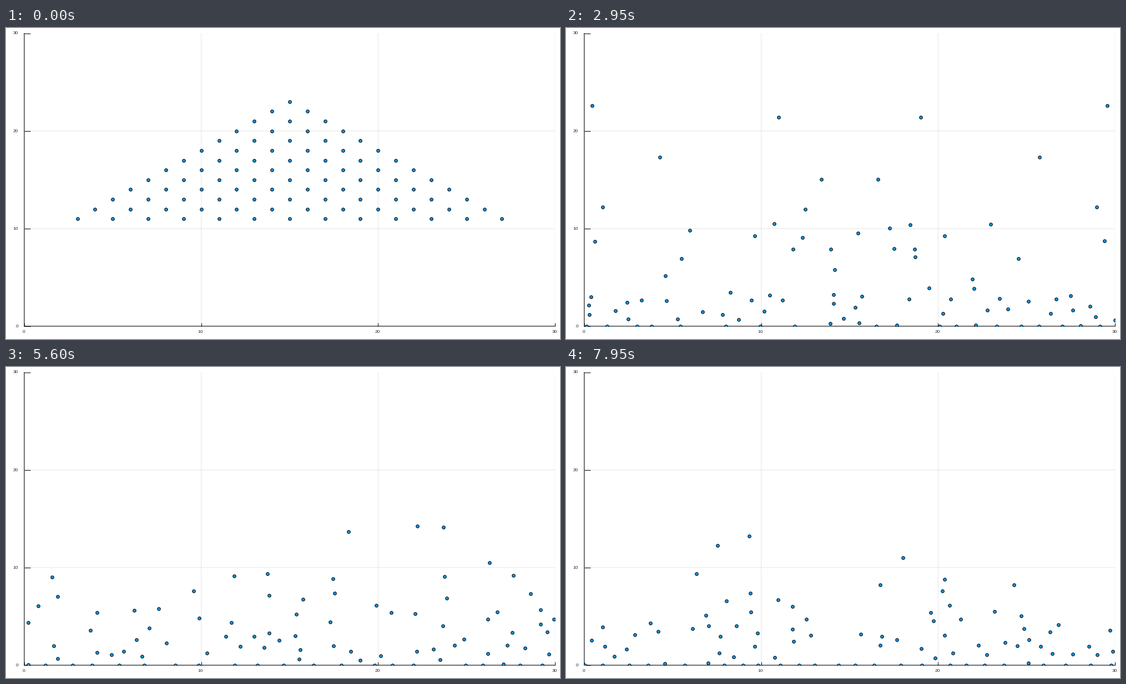
A matplotlib script that plays this animation: 998x561 px, repeating every 8 s.

```python
import numpy as np
import matplotlib.pyplot as plt
from matplotlib.animation import FuncAnimation

W, H, DPI = 998, 561, 100
FRAMES, INTERVAL = 160, 50
SIZE = 30.0                      # side of the box
GRAVITY, BOUNCE = 9.8, 0.75
FRAME_DT, STEPS = 0.075, 50
PX = 72 / DPI                    # one pixel in points


def start():
    """Triangular pile of particles on a diagonal lattice."""
    return np.array([(x, 11 + row) for row in range(13)
                     for x in range(3 + row, 28 - row, 2)], float)


def accel(p):
    """Lennard-Jones pair forces plus gravity."""
    d = p.T[:, :, None] - p.T[:, None, :]
    r2 = d[0] ** 2 + d[1] ** 2
    np.fill_diagonal(r2, np.inf)
    i2 = 1 / r2
    i6 = i2 * i2 * i2
    a = (24 * i6 * (2 * i6 - 1) * i2 * d).sum(axis=2).T
    a[:, 1] -= GRAVITY
    return a


def collide(p, v):
    low, high = p < 0, p > SIZE
    v[low] = BOUNCE * np.abs(v[low])
    v[high] = -BOUNCE * np.abs(v[high])
    np.clip(p, 0, SIZE, out=p)


def simulate():
    p = start()
    v = np.zeros_like(p)
    a = accel(p)
    dt = FRAME_DT / STEPS
    path = [p.copy()]
    for _ in range(FRAMES - 1):
        for _ in range(STEPS):
            v += a * dt / 2
            p += v * dt
            collide(p, v)
            a = accel(p)
            v += a * dt / 2
        path.append(p.copy())
    return path


path = simulate()

fig = plt.figure(figsize=(W / DPI, H / DPI), dpi=DPI, facecolor="white")
left, right, top, bottom = 32.9, 989.1, 9.6, 537.9
ax = fig.add_axes([left / W, 1 - bottom / H, (right - left) / W, (bottom - top) / H])
ax.set(xlim=(0, SIZE), ylim=(0, SIZE))
ticks = [0, 10, 20, 30]
ax.set_xticks(ticks, [])
ax.set_yticks(ticks, [])
ink = "#1a1a1a"
ax.tick_params(axis="x", direction="in", length=6 * PX, width=1.1 * PX, color=ink)
ax.tick_params(axis="y", direction="in", length=11.5 * PX, width=1.1 * PX, color=ink)
ax.set_axisbelow(True)
ax.grid(color="black", alpha=0.1, linewidth=PX, snap=False)
for tick in ax.xaxis.get_major_ticks() + ax.yaxis.get_major_ticks():
    tick.tick1line.set_snap(False)
for side in ("top", "right"):
    ax.spines[side].set_visible(False)
for side in ("left", "bottom"):
    ax.spines[side].set(linewidth=1.2 * PX, color=ink, zorder=1.5, snap=False)

label = dict(family="Liberation Sans", size=8.4 * PX, color="#262626")
for t in ticks:
    x = left + (right - left) * t / SIZE - 1.2
    y = bottom - (bottom - top) * t / SIZE
    fig.text(x / W, 1 - 548.3 / H, str(t), ha="center", va="center", **label)
    fig.text(22.2 / W, 1 - (y + 0.3) / H, str(t), ha="right", va="center", **label)

dots, = ax.plot([], [], "o", markersize=5.6 * PX, markerfacecolor="#009afa",
                markeredgecolor="black", markeredgewidth=PX, zorder=3, snap=False)


def draw(i):
    dots.set_data(path[i][:, 0], path[i][:, 1])
    return dots,


anim = FuncAnimation(fig, draw, frames=FRAMES, interval=INTERVAL, repeat=True,
                     repeat_delay=0, blit=False)
plt.show()
```
